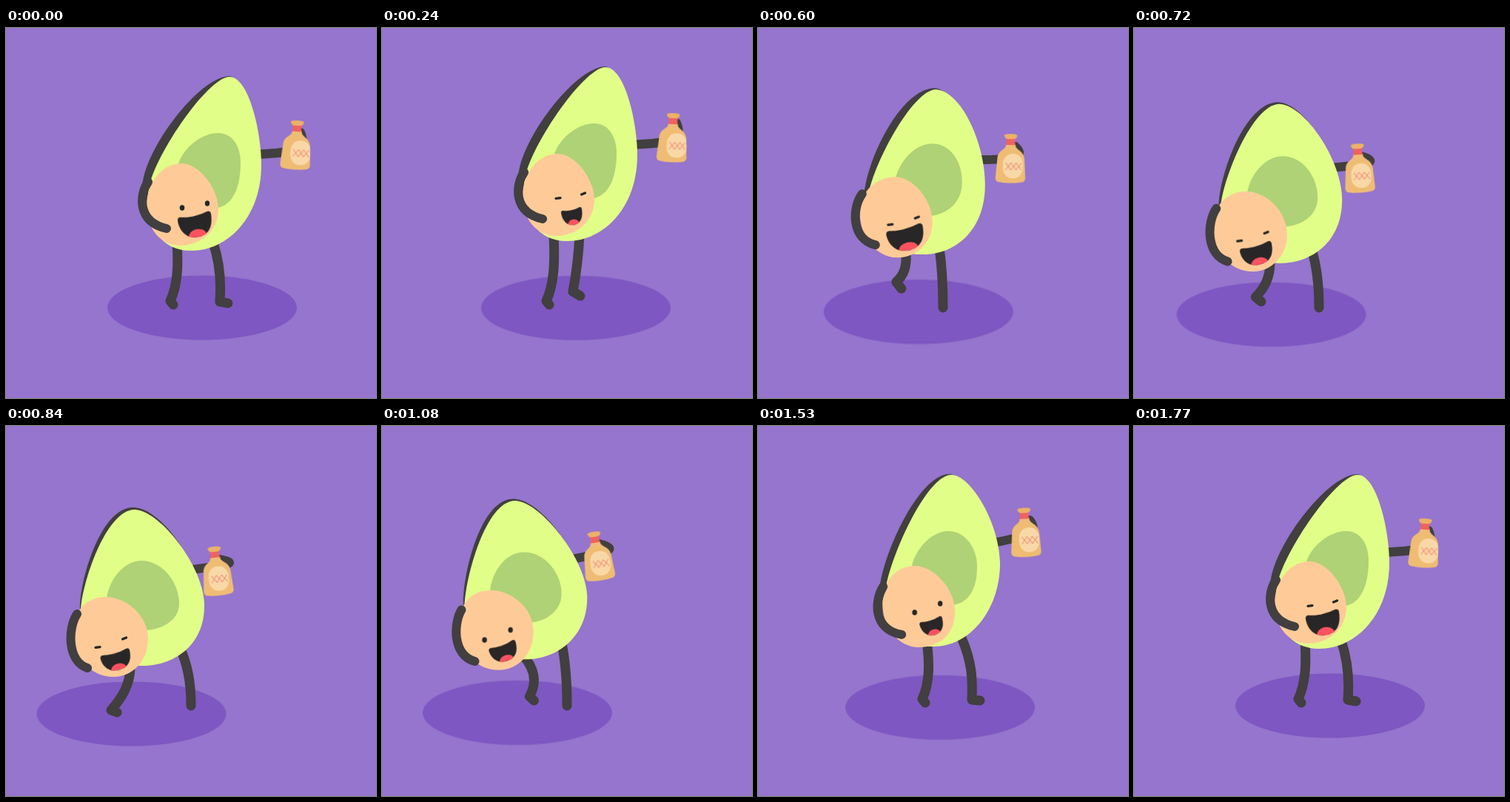
These frames come from a looping animation (500 by 500 pixels, 1800 ms). An HTML page without scripts:

```html
<!DOCTYPE html>
<html lang="en">
<head>
<meta charset="utf-8">
<title>Dancing avocado</title>
<style>
html, body { margin: 0; width: 100%; height: 100%; overflow: hidden; background: #9575cd; }
svg { display: block; width: 100%; height: 100%; }
svg * { animation: 1.8s linear infinite; }
.limb { fill: none; stroke: #413f3f; stroke-width: 13; stroke-linecap: round; stroke-linejoin: round; }
.arm { stroke-width: 12; }
.lash { stroke: #262626; stroke-width: 3.2; stroke-linecap: round; }

#ground { fill: #7e57c2; animation-name: ground; }
#hop { animation-name: hop; }
#legL { animation-name: legL; }
#legR { animation-name: legR; }
#armL { animation-name: armL; }
#armR { animation-name: armR; }
#skin { fill: #413f3f; animation-name: skin; }
#flesh { fill: #e1ff88; animation-name: flesh; }
#hollow { fill: #afd276; animation-name: hollow; }
#seed { fill: #fecb98; animation-name: seed; }
#eyeL { animation-name: eyeL; }
#eyeR { animation-name: eyeR; }
#mouth { animation-name: mouth; }
#bottle { animation-name: bottle; }
#label { animation-name: label; }
.open { fill: #262626; animation-name: open; animation-timing-function: step-end; }
.shut { animation-name: shut; animation-timing-function: step-end; }
text { font: 300 14px Lato, "Open Sans", sans-serif; letter-spacing: -1.5px; fill: #ee6a58; text-anchor: middle; }

@keyframes open { 0% { opacity: 1 } 6.667% { opacity: 0 } 58.333% { opacity: 1 } 91.667%, 100% { opacity: 0 } }
@keyframes shut { 0% { opacity: 0 } 6.667% { opacity: 1 } 58.333% { opacity: 0 } 91.667%, 100% { opacity: 1 } }

@keyframes hop {
  0% { transform: translateY(0); animation-timing-function: cubic-bezier(.3,.2,.6,1) }
  13.333% { transform: translateY(-13px); animation-timing-function: cubic-bezier(.5,0,.85,.7) }
  33.333%, 100% { transform: translateY(0) }
}
@keyframes ground {
  0%, 98.333%, 100% { transform: translate(265px,378px); animation-timing-function: cubic-bezier(.5,0,.8,.7) }
  13.333% { transform: translate(262px,378.3px); animation-timing-function: cubic-bezier(.5,.1,.85,.7) }
  33.333% { transform: translate(217px,383.5px); animation-timing-function: cubic-bezier(.25,.3,.65,1) }
  46.667% { transform: translate(169.5px,389px); animation-timing-function: cubic-bezier(.5,0,.8,.75) }
  71.667% { transform: translate(213px,384px); animation-timing-function: cubic-bezier(.3,.3,.7,.75) }
  85% { transform: translate(246px,380.3px); animation-timing-function: cubic-bezier(.3,.4,.6,1) }
}

@keyframes skin {
  0%, 13.333%, 98.333%, 100% { d: path("M301 65C322 66 342 140 342 185C342 255 298 298 250 298C208 298 184 265 184 215C186 165 260 67 301 65Z"); animation-timing-function: cubic-bezier(.5,0,.85,.7) }
  33.333% { d: path("M239 81C270 84 303 155 303 212C303 268 268 303 222 303C172 303 143 280 143 232C144 182 193 81 239 81Z"); animation-timing-function: cubic-bezier(.25,.3,.65,1) }
  46.667% { d: path("M173 110C212 112 264 190 266 243C266 296 224 322 185 322C140 322 100 300 100 248C99 210 128 108 173 110Z"); animation-timing-function: cubic-bezier(.5,0,.8,.75) }
  71.667% { d: path("M191 73C229 74 296 160 296 208C296 260 253 294 215 294C165 294 132 275 132 228C131 175 147 71 191 73Z"); animation-timing-function: cubic-bezier(.3,.3,.7,.75) }
  85% { d: path("M259 65C284 67 322 130 324 185C324 248 283 295 238 295C190 295 164 268 164 222C166 180 216 64 259 65Z"); animation-timing-function: cubic-bezier(.3,.4,.6,1) }
}
@keyframes flesh {
  0%, 13.333%, 98.333%, 100% { d: path("M302 66C328 66 345 140 345 185C345 255 300 301 250 301C210 301 190 270 192 222C195 180 272 66 302 66Z"); animation-timing-function: cubic-bezier(.5,0,.85,.7) }
  33.333% { d: path("M242 83C275 86 307 155 307 212C307 270 270 306 222 306C175 306 146 280 148 232C153 188 210 81 242 83Z"); animation-timing-function: cubic-bezier(.25,.3,.65,1) }
  46.667% { d: path("M175 113C208 115 268 190 268 243C268 298 225 324 185 324C140 324 100 300 101 248C102 215 135 111 175 113Z"); animation-timing-function: cubic-bezier(.5,0,.8,.75) }
  71.667% { d: path("M194 74C228 75 298 160 298 208C298 262 255 296 215 296C165 296 135 275 135 228C136 185 152 73 194 74Z"); animation-timing-function: cubic-bezier(.3,.3,.7,.75) }
  85% { d: path("M262 66C287 67 326 130 327 185C327 250 285 298 238 298C195 298 171 270 172 224C176 182 228 64 262 66Z"); animation-timing-function: cubic-bezier(.3,.4,.6,1) }
}
@keyframes hollow {
  0%, 13.333%, 98.333%, 100% { d: path("M287 142C306 142 317 160 317 182C317 218 305 244 278 244C245 244 232 220 232 190C232 172 258 142 287 142Z"); animation-timing-function: cubic-bezier(.5,0,.85,.7) }
  33.333% { d: path("M236 156C260 156 276 180 276 208C276 240 250 254 228 254C200 254 184 235 186 206C188 185 210 156 236 156Z"); animation-timing-function: cubic-bezier(.25,.3,.65,1) }
  46.667% { d: path("M183 182C212 182 234 212 234 240C234 264 208 276 187 276C158 276 134 260 136 234C138 210 158 182 183 182Z"); animation-timing-function: cubic-bezier(.5,0,.8,.75) }
  71.667% { d: path("M211 145C240 145 262 172 262 196C262 225 240 243 215 243C188 243 166 230 168 200C170 172 185 145 211 145Z"); animation-timing-function: cubic-bezier(.3,.3,.7,.75) }
  85% { d: path("M257 142C280 142 296 165 296 190C296 222 283 242 258 242C225 242 208 220 208 188C212 170 232 142 257 142Z"); animation-timing-function: cubic-bezier(.3,.4,.6,1) }
}
@keyframes seed {
  0%, 13.333%, 98.333%, 100% { d: path("M237 183C262 183 287 218 287 245C287 275 262 294 235 294C208 294 190 270 190 240C190 208 212 183 237 183Z"); animation-timing-function: cubic-bezier(.5,0,.85,.7) }
  33.333% { d: path("M186 201C210 201 236 233 236 262C236 292 212 310 189 310C158 310 138 280 138 250C138 218 162 201 186 201Z"); animation-timing-function: cubic-bezier(.25,.3,.65,1) }
  46.667% { d: path("M134 231C162 231 192 255 192 288C192 318 170 339 146 339C112 339 91 310 91 280C91 248 110 231 134 231Z"); animation-timing-function: cubic-bezier(.5,0,.8,.75) }
  71.667% { d: path("M172 202C200 200 233 222 233 254C233 290 212 309 185 309C152 309 133 280 133 250C133 218 150 203 172 202Z"); animation-timing-function: cubic-bezier(.3,.3,.7,.75) }
  85% { d: path("M211 189C238 189 266 220 266 251C266 282 245 299 217 299C188 299 168 270 168 240C168 208 188 189 211 189Z"); animation-timing-function: cubic-bezier(.3,.4,.6,1) }
}

@keyframes armL {
  0%, 13.333%, 98.333%, 100% { d: path("M192 208C180 225 177 262 217 271"); animation-timing-function: cubic-bezier(.5,0,.85,.7) }
  33.333% { d: path("M141 224C127 243 126 285 159 293"); animation-timing-function: cubic-bezier(.25,.3,.65,1) }
  46.667% { d: path("M96 254C83 274 83 318 110 327"); animation-timing-function: cubic-bezier(.5,0,.8,.75) }
  71.667% { d: path("M133 236C126 252 123 292 160 298"); animation-timing-function: cubic-bezier(.3,.3,.7,.75) }
  85% { d: path("M169 217C157 236 155 275 194 282"); animation-timing-function: cubic-bezier(.3,.4,.6,1) }
}
@keyframes armR {
  0%, 13.333%, 98.333%, 100% { d: path("M335 171C395 168 408 165 398 141"); animation-timing-function: cubic-bezier(.5,0,.85,.7) }
  33.333% { d: path("M297 178C340 178 365 175 348 160"); animation-timing-function: cubic-bezier(.25,.3,.65,1) }
  46.667% { d: path("M245 195C275 190 328 187 287 180"); animation-timing-function: cubic-bezier(.5,0,.8,.75) }
  71.667% { d: path("M268 150C300 138 337 128 310 113"); animation-timing-function: cubic-bezier(.3,.3,.7,.75) }
  85% { d: path("M313 159C355 150 383 147 367 127"); animation-timing-function: cubic-bezier(.3,.4,.6,1) }
}

@keyframes legL {
  0%, 98.333%, 100% { d: path("M231 290C233 322 232 347 222 369L226 374") }
  13.333% { d: path("M232 280C234 320 232 347 222 369L226 374") }
  25% { d: path("M225 286C233 320 232 347 222 369L226 374") }
  33.333% { d: path("M200 300C202 325 196 335 187 343L194 352") }
  46.667%, 50% { d: path("M168 325C168 350 156 368 142 384L150 387") }
  56.667% { d: path("M178 315C188 335 186 350 176 362L184 368") }
  63.333% { d: path("M200 303C226 320 232 345 222 369L226 374") }
  71.667% { d: path("M217 290C234 315 232 345 222 369L226 374") }
  85% { d: path("M228 290C232 322 232 347 222 369L226 374") }
}
@keyframes legR {
  0%, 98.333%, 100% { d: path("M280 290C290 320 291 345 289 370L300 372") }
  13.333% { d: path("M267 280C265 320 261 340 258 356L268 362") }
  25% { d: path("M258 289C253 320 251 350 250 377L250 378") }
  33.333% { d: path("M245 297C249 325 250 350 250 377L250 378") }
  46.667% { d: path("M235 300C247 325 250 350 250 377L250 378") }
  68.333% { d: path("M247 285C250 320 250 350 250 377L250 378") }
  71.667% { d: path("M249 280C250 320 250 345 250 371L254 373") }
  76.667% { d: path("M258 283C268 315 270 340 268 362L279 365") }
  81.667% { d: path("M270 285C288 320 290 345 289 370L300 371") }
  85% { d: path("M275 286C290 320 290 345 289 370L300 371") }
}

@keyframes eyeL {
  0%, 13.333%, 98.333%, 100% { transform: translate(238px,243px); animation-timing-function: cubic-bezier(.5,0,.85,.7) }
  33.333% { transform: translate(179px,265.5px); animation-timing-function: cubic-bezier(.25,.3,.65,1) }
  46.667% { transform: translate(124px,299px); animation-timing-function: cubic-bezier(.5,0,.8,.75) }
  71.667% { transform: translate(171px,267px); animation-timing-function: cubic-bezier(.3,.3,.7,.75) }
  85% { transform: translate(211.5px,252px); animation-timing-function: cubic-bezier(.3,.4,.6,1) }
}
@keyframes eyeR {
  0%, 13.333%, 98.333%, 100% { transform: translate(272px,237px); animation-timing-function: cubic-bezier(.5,0,.85,.7) }
  33.333% { transform: translate(215px,256px); animation-timing-function: cubic-bezier(.25,.3,.65,1) }
  46.667% { transform: translate(160px,287px); animation-timing-function: cubic-bezier(.5,0,.8,.75) }
  71.667% { transform: translate(204px,250px); animation-timing-function: cubic-bezier(.3,.3,.7,.75) }
  85% { transform: translate(246px,240px); animation-timing-function: cubic-bezier(.3,.4,.6,1) }
}
@keyframes mouth {
  0%, 98.333%, 100% { transform: translate(256px,264px) rotate(-11deg) scale(1,1) }
  13.333% { transform: translate(257px,266px) rotate(-10deg) scale(.62,.7); animation-timing-function: cubic-bezier(.5,0,.85,.7) }
  33.333% { transform: translate(200px,281.5px) rotate(-13deg) scale(1.1,1.02); animation-timing-function: cubic-bezier(.25,.3,.65,1) }
  46.667% { transform: translate(149px,315px) rotate(-15deg) scale(.89,.8); animation-timing-function: cubic-bezier(.5,0,.8,.75) }
  71.667% { transform: translate(199px,279px) rotate(-27deg) scale(.69,.7); animation-timing-function: cubic-bezier(.3,.3,.7,.75) }
  85% { transform: translate(235px,269.5px) rotate(-16deg) scale(.69,.7); animation-timing-function: cubic-bezier(.3,.4,.6,1) }
}

@keyframes bottle {
  0%, 98.333%, 100% { transform: translate(394px,125px) rotate(3.5deg) }
  13.333% { transform: translate(394px,128px) rotate(3deg); animation-timing-function: cubic-bezier(.5,0,.85,.7) }
  33.333% { transform: translate(342px,143px) rotate(1deg); animation-timing-function: cubic-bezier(.25,.3,.65,1) }
  46.667% { transform: translate(281px,163px) rotate(-6deg); animation-timing-function: cubic-bezier(.5,0,.8,.75) }
  71.667% { transform: translate(297px,98px) rotate(-14deg); animation-timing-function: cubic-bezier(.3,.3,.7,.75) }
  85% { transform: translate(359px,110.5px) rotate(-3deg); animation-timing-function: cubic-bezier(.3,.4,.6,1) }
}
@keyframes label {
  0%, 13.333%, 98.333%, 100% { transform: translateX(6.5px) }
  33.333%, 71.667% { transform: translateX(3.5px) }
  46.667% { transform: translateX(2px) }
  85% { transform: translateX(5px) }
}
</style>
</head>
<body>
<svg viewBox="0 0 500 500">
  <defs>
    <path id="lips" d="M-19-12Q0-7 19-13Q24-13 23-7C22 10 14 19 0 19C-14 19-23 8-23-7Q-23-12-19-12Z"/>
    <path id="glass" d="M-6.500 15C-6 22-16 21-17.500 32L-20 60Q-20 63-17 65Q0 68 17 65Q20.500 63 20.500 60L19 34C18 22 6.500 22 6.500 15Z"/>
    <clipPath id="inLips"><use href="#lips"/></clipPath>
    <clipPath id="inGlass"><use href="#glass"/></clipPath>
  </defs>

  <ellipse id="ground" rx="128" ry="43.500"/>
  <path id="legL" class="limb"/>
  <path id="legR" class="limb"/>

  <g id="hop">
    <path id="armR" class="limb arm"/>
    <path id="skin"/>
    <path id="flesh"/>
    <path id="hollow"/>
    <path id="seed"/>

    <g id="eyeL">
      <ellipse class="open" rx="3.300" ry="3.700"/>
      <path class="lash shut" d="M-3 .4L3-.4"/>
    </g>
    <g id="eyeR">
      <ellipse class="open" rx="3.200" ry="3.700"/>
      <path class="lash shut" d="M-2.500 1L2.500-1"/>
    </g>
    <g id="mouth">
      <use href="#lips" fill="#282626"/>
      <g clip-path="url(#inLips)"><ellipse cy="17" rx="12" ry="9" fill="#fb5260"/></g>
    </g>
    <path id="armL" class="limb arm"/>

    <g id="bottle">
      <path d="M-6.500 6L6.500 6L5.500 11L7 16L-7 16L-5.500 11Z" fill="#f0625f"/>
      <use href="#glass" fill="#efbc74"/>
      <path d="M-9 2Q-8 0 0 0Q8 0 9 2Q8.500 5 6 6.500Q0 7.500-6 6.500Q-8.500 5-9 2Z" fill="#ecb166"/>
      <g clip-path="url(#inGlass)">
        <g id="label">
          <rect x="-13.500" y="27" width="27" height="33" rx="12.500" ry="14" fill="#f9d8a8"/>
          <text x="0" y="49">XXX</text>
        </g>
      </g>
    </g>
  </g>
</svg>
</body>
</html>
```
